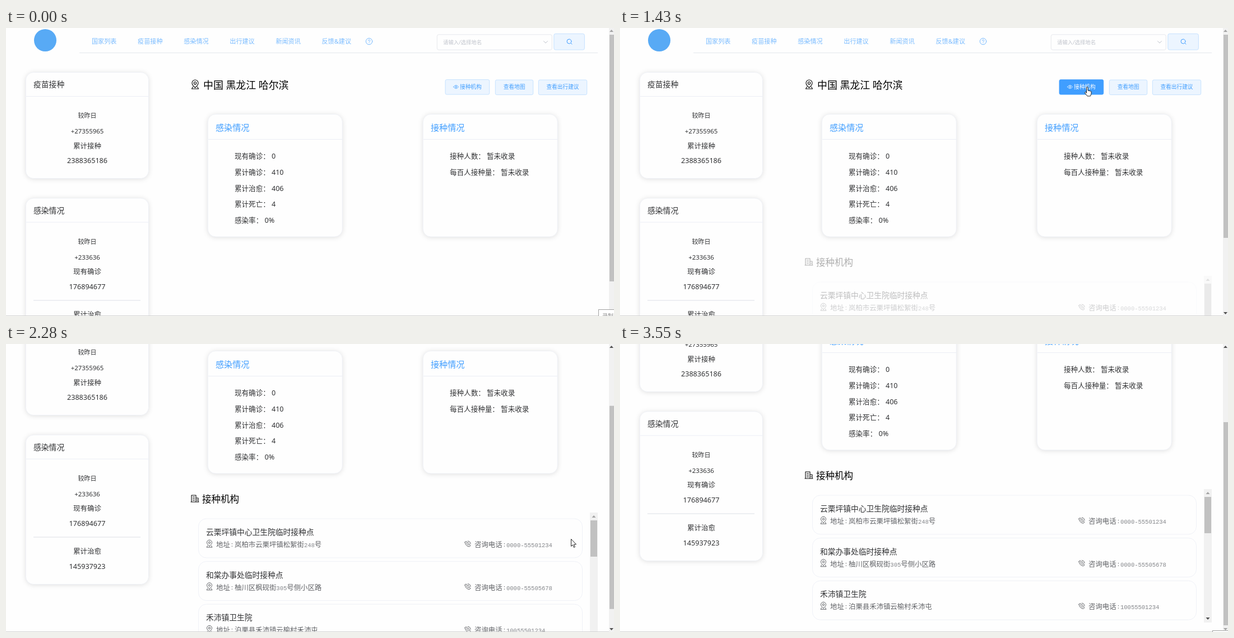
Animation, 1085 px wide and 516 px high, one loop 3820 ms. Source, as an HTML page:

```html
<!DOCTYPE html>
<html lang="zh-CN">
<head>
<meta charset="utf-8">
<style>
html, body { margin: 0; width: 100%; height: 100%; overflow: hidden; background: #fefefe; }
svg { display: block; }
text { font-family: "Noto Sans", "Noto Sans CJK SC", sans-serif; white-space: pre; }
.thin { font-family: "Noto Sans CJK SC", sans-serif; font-weight: 300; }
.num { font-family: "Liberation Mono", monospace; font-size: 10.5px; fill: #85878b; }
.card { fill: #fefefe; stroke: #ebeef5; stroke-width: .7; filter: drop-shadow(0 1px 4px rgba(0,0,0,.12)); }
.line { fill: none; stroke: #ebeef5; stroke-width: .8; }
.icon { fill: none; stroke-linejoin: round; stroke-linecap: round; }
</style>
</head>
<body>
<svg id="stage" width="1085" height="516" viewBox="0 0 1085 516"></svg>
<script>
const BLUE = '#409eff', DARK = '#303133', GREY = '#606266';
const LOOP = 3820;

const text = (x, cy, size, str, fill = DARK, extra = '') =>
  `<text x="${x}" y="${cy + size * .38}" font-size="${size}" fill="${fill}" ${extra}>${str}</text>`;
const mid = (x, cy, size, str, fill) => text(x, cy, size, str, fill, 'text-anchor="middle"');
const rect = (x, y, w, h, r, attrs) =>
  `<rect x="${x}" y="${y}" width="${w}" height="${h}" rx="${r}" ${attrs}/>`;
const icon = (x, y, color, d, width = 1) =>
  `<path class="icon" transform="translate(${x} ${y})" stroke="${color}" stroke-width="${width}" d="${d}"/>`;
const hline = (x1, x2, y, color = '#ebeef5') => `<path d="M${x1} ${y}H${x2}" stroke="${color}"/>`;
const arrow = (x, y, dir, fill) =>
  `<path d="M${x - 3.5} ${y + 2 * dir}h7l-3.5 ${-4 * dir}z" fill="${fill}"/>`;

const PIN = 'M0 4C-3 1.5-4.5-.5-4.5-2.5A4.5 4.5 0 0 1 4.5-2.5C4.5-.5 3 1.5 0 4zM1.7-2.4A1.7 1.7 0 1 1-1.7-2.4A1.7 1.7 0 1 1 1.7-2.4M-3.2 3L-5 6H5L3.2 3';
const BIG_PIN = 'M0 6C-4 2.5-5.5 0-5.5-2.5A5.5 5.5 0 0 1 5.5-2.5C5.5 0 4 2.5 0 6zM2.2-2.3A2.2 2.2 0 1 1-2.2-2.3A2.2 2.2 0 1 1 2.2-2.3M-4 4.5L-6 8H6L4 4.5';
const EYE = 'M-4.5 0Q0-6 4.5 0Q0 6-4.5 0zM1.4 0A1.4 1.4 0 1 1-1.4 0A1.4 1.4 0 1 1 1.4 0';
const PHONE = 'M-5-3L-3-5L-1-2L-2-1Q-1 1 1 2L2 1L5 3L3 5Q-4 4-5-3zM0-5Q5-5 5 0M0-2.5Q2.5-2.5 2.5 0';
const BUILDING = 'M-6 6V-6H2V6M2-1H6V6M-7 6H7M-3.5-3H-.5M-3.5 0H-.5M-3.5 3H-.5M4 2V3';

function header() {
  const nav = ['国家列表', '疫苗接种', '感染情况', '出行建议', '新闻资讯', '反馈&amp;建议'];
  const pale = '#79bbff';
  return '<circle cx="70" cy="22" r="20" fill="#58aaf5"/>' +
    nav.map((s, i) => text(153 + 82.1 * i, 23.5, 11.1, s, pale)).join('') +
    `<circle cx="648" cy="24" r="5.7" class="icon" stroke="${pale}"/>` +
    icon(648, 24, pale, 'M-1.8-1.2Q-1.6-3 0-3T1.8-1.3Q1.8-.3 0 .8V1.2M0 3V3.1') +
    hline(131, 1056, 44.5, '#e4e7ed') +
    rect(769.3, 11.8, 205, 27.4, 3, 'fill="#fefefe" stroke="#dcdfe6" stroke-width=".7"') +
    text(780, 25.5, 9.4, '请输入/选择地名', '#c0c4cc') +
    icon(963, 25, '#c0c4cc', 'M-3.5-1.5L0 2L3.5-1.5') +
    rect(977.8, 10.3, 54.6, 28.8, 3, 'fill="#ecf5ff" stroke="#b3d8ff" stroke-width=".7"') +
    icon(1005, 24.5, BLUE, 'M4-.5A4 4 0 1 1-4-.5A4 4 0 1 1 4-.5M3 2.5L5 4.5');
}

function sideCard(y, h, title, rows) {
  return rect(35.3, y, 219.2, h, 14, 'class="card"') + text(49, y + 21.5, 13.8, title) +
    hline(36, 254, y + 43) +
    rows.map(([dy, size, s]) => mid(145, y + dy, size, s)).join('');
}

function infoCard(x, title, rows) {
  return rect(x + .2, 154.5, 240, 219.5, 14, 'class="card"') + text(x + 14, 178, 15.1, title, BLUE) +
    hline(x + 1, x + 240, 199.5) +
    rows.map((s, i) => text(x + 48, 229 + 28.9 * i, 12.55, s)).join('');
}

function button(i, x, y, w, label, eye) {
  const cx = x + w / 2 + (eye ? 6 : 0);
  const face = (fill, stroke, ink) =>
    rect(x + .3, y + .3, w - .6, 26.6, 2.5, `fill="${fill}" stroke="${stroke}" stroke-width=".7"`) +
    mid(cx, 105.5, 9.7, label, ink) + (eye ? icon(803, 105.5, ink, EYE, .8) : '');
  return face('#ecf5ff', '#b3d8ff', BLUE) + `<g id="hot${i}">${face(BLUE, BLUE, '#fff')}</g>`;
}

function site(i, name, address, phone) {
  const y = 455 + 76.6 * i, cy = y + 46.2, thin = 'class="thin"';
  const digits = s => s.replace(/[\d-]+/g, '<tspan class="num">$&</tspan>');
  return rect(343.5, y, 685, 70, 14, 'class="line"') + text(357, y + 24, 13.75, name) +
    icon(363, cy - 1, GREY, PIN) + text(375, cy, 12.4, '地址', GREY, thin) +
    text(402, cy, 10.5, ':', GREY) + text(408, cy, 12.4, digits(address), GREY, thin) +
    icon(824, cy - 1, GREY, PHONE) + text(836, cy, 12.4, '咨询电话', GREY, thin) +
    text(888, cy, 10.5, ':', GREY) + text(893, cy, 12.4, digits(phone), GREY, thin);
}

document.getElementById('stage').innerHTML = '<g id="page">' + header() +
  sideCard(79.5, 190, '疫苗接种', [[77.5, 11, '较昨日'], [105, 11.4, '+27355965'],
    [131.5, 12.5, '累计接种'], [157.5, 12.6, '2388365186']]) +
  sideCard(305, 267.5, '感染情况', [[77.5, 11, '较昨日'], [105.5, 11.4, '+233636'], [131.5, 12.5, '现有确诊'],
    [158, 12.6, '176894677'], [208, 12.5, '累计治愈'], [235, 12.6, '145937923']]) +
  hline(49, 240, 488, '#dcdfe6') +
  icon(337.5, 101, '#000', BIG_PIN, 1.1) + text(352, 102, 17.9, '中国 黑龙江 哈尔滨', '#000') +
  button(0, 783.7, 92.2, 79.3, '接种机构', true) + button(1, 873, 92.7, 68, '查看地图') +
  button(2, 950, 92.7, 87, '查看出行建议') +
  infoCard(360, '感染情况', ['现有确诊： 0', '累计确诊： 410', '累计治愈： 406', '累计死亡： 4', '感染率： 0%']) +
  infoCard(744, '接种情况', ['接种人数： 暂未收录', '每百人接种量： 暂未收录']) +
  '<g id="sites">' + icon(337, 419, '#000', BUILDING, 1.1) + text(350, 420, 16.5, '接种机构', '#000') +
  site(0, '云栗坪镇中心卫生院临时接种点', '岚柏市云栗坪镇松絮街248号', '0000-55501234') +
  site(1, '和棠办事处临时接种点', '柚川区枫砚街305号侧小区路', '0000-55505678') +
  site(2, '禾沛镇卫生院', '泊栗县禾沛镇云榆村禾沛屯', '10055501234') +
  rect(1042, 444, 14, 239, 0, 'fill="#f1f1f1"') + rect(1043, 458, 12, 65, 0, 'fill="#c1c1c1"') +
  arrow(1049, 451, 1, '#a3a3a3') + arrow(1049, 676, -1, '#505050') + '</g></g>' +
  rect(1076, 0, 9, 516, 0, 'fill="#f1f1f1"') + '<rect id="thumb" x="1077" width="8"/>' +
  '<g id="arrows"></g>' + hline(0, 1076, 515.5, '#d4d4d4') +
  '<g id="recorder">' + rect(.5, .5, 40, 30, 0, 'fill="#fff" stroke="#a0a0a0"') +
  text(7, 12.5, 10, '录制', '#888') + '</g>' +
  '<g id="cursor" fill="#fff" stroke="#222" stroke-linejoin="round">' +
  '<path id="point" d="M.5.5V13.5L3.4 10.8L5.4 15.5L7.4 14.6L5.5 10H9.5z"/>' +
  '<path id="hand" d="M3.5 10V2Q3.5.5 4.8.5T6 2V7L10.5 8Q12 8.4 12 10V12.5L10.5 17H5L1 12Q0 10 1.3 9.6T3.5 11.5z"/></g>';

const el = id => document.getElementById(id);
const clamp = v => Math.max(0, Math.min(1, v));

// Linear interpolation through [time, ...values] keys.
function track(keys, t) {
  const i = keys.findIndex(k => k[0] > t);
  if (i < 0) return keys[keys.length - 1].slice(1);
  if (!i) return keys[0].slice(1);
  const a = keys[i - 1], b = keys[i], u = (t - a[0]) / (b[0] - a[0]);
  return a.slice(1).map((v, j) => v + (b[j + 1] - v) * u);
}

const PATH = [[140, 1072, 470], [550, 994, 100], [610, 985, 96], [750, 940, 86], [870, 905, 93],
  [940, 870, 98], [1000, 831, 103], [1160, 831, 103], [1220, 829, 105], [1800, 829, 105],
  [2150, 1003, 349], [2280, 1008, 349], [2600, 1008, 349], [2610, 1009, 349], [2870, 1009, 349], [3200, 1086, 515]];
const SCROLL = [[2130, 0], [2150, 1], [2215, 70], [2280, 141], [2345, 176], [2410, 184]];
const RECORDER = [[69, 504], [70, 508], [200, 517], [3390, 517], [3400, 515], [3550, 513]];
const HOVER = [[1005, LOOP], [860, 980], [600, 740]];

function draw(t) {
  const scroll = Math.round(track(SCROLL, t)[0]);
  el('page').setAttribute('transform', `translate(0 ${-scroll})`);

  const open = clamp((t - 1400) / 100);
  el('sites').setAttribute('opacity', open);
  const thumb = el('thumb');
  thumb.setAttribute('y', 12 + scroll * 128 / 184);
  thumb.setAttribute('height', open ? 364 : 442);
  thumb.setAttribute('fill', t > 3060 && t < 3200 ? '#a8a8a8' : '#c1c1c1');
  el('arrows').innerHTML = arrow(1080.5, 5, 1, scroll ? '#505050' : '#a3a3a3') +
    arrow(1080.5, 511, -1, scroll < 184 ? '#505050' : '#a3a3a3');

  HOVER.forEach(([on, off], i) =>
    el('hot' + i).setAttribute('opacity', clamp((t - on) / 60) - clamp((t - off) / 100)));

  const [x, y] = track(PATH, t).map(Math.round);
  const hand = (t > 600 && t < 740) || (t > 850 && t < 1835);
  el('cursor').setAttribute('transform', `translate(${x} ${y})`);
  el('cursor').style.display = t < 140 || t >= 3200 ? 'none' : '';
  el('hand').style.display = hand ? '' : 'none';
  el('point').style.display = hand ? 'none' : '';
  el('recorder').setAttribute('transform', `translate(1057 ${Math.round(track(RECORDER, t)[0])})`);
}

function tick() {
  draw(performance.now() % LOOP);
  requestAnimationFrame(tick);
}
tick();
</script>
</body>
</html>
```
